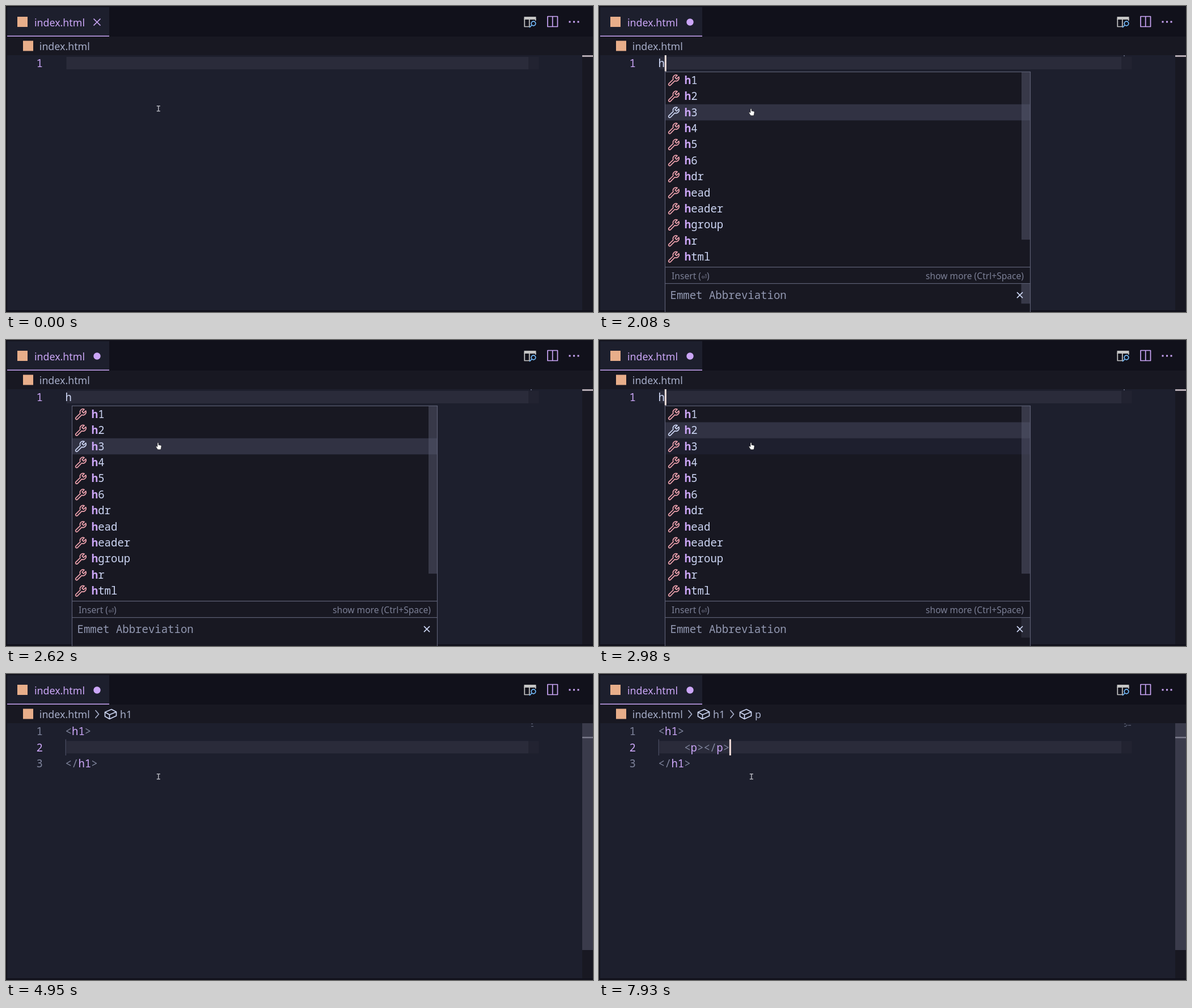
These frames come from a looping animation (1035x541 px, 8 s). An HTML page:

```html
<!DOCTYPE html>
<html lang="en">
<head>
<meta charset="utf-8">
<title>Editor completion</title>
<style>
  html, body { margin: 0; width: 100%; height: 100%; overflow: hidden; background: #11111b; }
  svg { display: block; width: 1035px; height: 541px; }
  text { white-space: pre; }
  .ui { font: 17.8px "Noto Sans", "Open Sans", sans-serif; fill: #a6adc8; }
  .code { font: 19px "Noto Sans Mono", "DejaVu Sans Mono", monospace; fill: #cdd6f4; }
  .small { font-size: 15.6px; fill: #7b7f95; }
  .key { font: 12px "DejaVu Sans", sans-serif; }
  .hint { font-size: 16.2px; fill: #9399b2; }
  .doc { fill: #9399b2; }
  .tag { fill: #cba6f7; }
  .dim { fill: #7f849c; }
  .match { fill: #cba6f7; font-weight: 700; }
  .line { fill: none; stroke-width: 1.7; stroke-linejoin: round; }
  .row .line { stroke: #eba0ac; }
  .row .snip { stroke: #f2cdcd; }
  .row.on .line { stroke: #cdd6f4; }
  .mauve { stroke: #cba6f7; }
  .pale { stroke: #cdd6f4; }
  .edge { fill: none; stroke: #5c5f74; stroke-width: 1.2; }
  .panel { fill: #181822; }
  .bar { fill: #585b70; fill-opacity: .5; }
  .mini { fill: #6c7086; fill-opacity: .8; }
</style>
</head>
<body>
<svg viewBox="0 0 1035 541">
  <defs>
    <path id="wrench" transform="scale(1.42)" stroke-width="1.2"
      d="M1.8 14.2a1.4 1.4 0 0 1 0-2L7.2 6.9a3.8 3.8 0 0 1 5-5L9.5 4.7l1.8 1.8 2.8-2.7a3.8 3.8 0 0 1-5 5L3.8 14.2a1.4 1.4 0 0 1-2 0z"/>
    <path id="cube" class="line pale" d="M1 6 12.5 1 21 5.5V12.5L9 18 1 13.5zM1 6l8 4.5L21 5.5M9 10.5V18"/>
    <path id="chevron" class="line" stroke="#a6adc8" d="M0 0l6 7-6 7"/>
  </defs>

  <!-- window frame -->
  <rect width="1035" height="541" fill="#11111b"/>
  <rect x="2" y="2" width="180" height="51" fill="#1d1f2d"/>
  <rect x="2" y="52.5" width="180" height="1.5" fill="#cba6f7"/>
  <rect x="2" y="54" width="1033" height="33" class="panel"/>
  <rect x="2" y="87" width="1014" height="451" fill="#1d1f2d"/>
  <rect x="1016" y="87" width="19" height="451" class="panel"/>

  <rect x="20" y="19" width="18" height="18" fill="#e8ae8a"/>
  <text class="ui tag" x="50" y="36">index.html</text>
  <path class="line mauve" d="M154.500 22.500l12 12M166.500 22.500l-12 12" data-t="0-640"/>
  <circle cx="160.5" cy="28.5" r="6.2" class="tag" data-t="640-8000"/>

  <g>
    <path fill="#c5c5c5" d="M913.5 19h21v5h-21z"/>
    <path class="line" stroke="#c5c5c5" d="M914.3 22v14.5h8.5V22M933.7 22v4"/>
    <circle class="line" cx="930" cy="31" r="3.8" stroke="#75beff"/>
    <path class="line" stroke="#75beff" d="M927 34l-4 4"/>
    <path class="line mauve" d="M955 18.5h17.5v18h-17.5zM963.7 18.5v18"/>
    <path class="tag" d="M992.5 26.5h3v3h-3zM1000 26.5h3v3h-3zM1007.5 26.5h3v3h-3z"/>
  </g>

  <!-- breadcrumbs -->
  <rect x="30" y="61.5" width="18" height="18" fill="#e8ae8a"/>
  <text class="ui" x="58.8" y="78">index.html</text>
  <g data-t="3780-8000">
    <use href="#chevron" x="157.5" y="64"/>
    <use href="#cube" x="173.5" y="61.5"/>
    <text class="ui" x="201" y="78">h1</text>
  </g>
  <g data-t="6730-8000">
    <use href="#chevron" x="231.5" y="64"/>
    <use href="#cube" x="247.5" y="61.5"/>
    <text class="ui" x="275" y="78">p</text>
  </g>

  <!-- editor -->
  <g id="current">
    <rect x="106.5" y="90" width="814.5" height="22" fill="#2a2b3a"/>
    <rect x="921" y="90" width="18.5" height="22" fill="#222331"/>
  </g>
  <g class="code">
    <text class="tag" x="53.5" y="108" data-t="0-4050">1</text>
    <text x="104.6" y="108" data-t="640-3330">h</text>
    <g data-t="3330-4050" id="pair"></g>
    <g data-t="4050-8000" id="block">
      <text class="dim" x="53.5" y="108">1</text>
      <text class="tag" x="53.5" y="136.5">2</text>
      <text class="dim" x="53.5" y="165">3</text>
      <path stroke="#585b70" d="M105.3 115.5v28.5"/>
    </g>
    <text x="150.2" y="136.5" data-t="5570-6290">p</text>
    <g data-t="6290-8000" id="inner"></g>
  </g>

  <!-- minimap and scrollbar -->
  <path class="mini" d="M925 87h2v2h-2z" data-t="640-3330"/>
  <path class="mini" d="M926 87h4v1.5h-4zM931 87h5v1.5h-5z" data-t="3330-4050"/>
  <path class="mini" d="M926 87.5h3v1.2h-3zM926 92h4v1.2h-4z" data-t="4050-8000"/>
  <path class="mini" d="M929 90h2v1.2h-2z" data-t="5570-6290"/>
  <path class="mini" d="M929 90h3v1.2h-3zM933 90h5v1.2h-5z" data-t="6290-8000"/>
  <rect x="1016" y="87" width="19" height="3" fill="#b5abb3" data-t="0-4050"/>
  <g id="thumb" data-t="4050-8000">
    <rect x="1016" y="87" width="19" height="401" fill="#3a3b4b"/>
    <rect x="1016" y="111" width="19" height="2.5" fill="#7a7b8b"/>
  </g>

  <g id="tags" transform="translate(116.5 116.5)" data-t="730-3330"></g>
  <g id="words" transform="translate(161.5 145.5)" data-t="5660-6290"></g>

  <rect id="caret" width="3" height="28.5" fill="#f5e0dc"/>

  <path id="beam" fill="none" stroke="#b4b5bd" stroke-width="1.5"
    d="M265.8 176.700h2.2l.8.8.8-.8h2.2M265.8 185.800h2.2l.8-.8.8.8h2.2M268.8 177.500v7.5"/>
  <path id="hand" fill="#fff" stroke="#222" stroke-width=".6"
    d="M267 182q1-1.2 2 0v3.5l4 .8q1.2.4 1 1.8l-.8 4.2q-.3 1.5-1.7 1.5h-3q-1.2-.2-1.8-1.3l-2.2-3.5q-.3-1.5 1.2-1.2l1.3 1z"/>
</svg>
<script>
const LOOP = 8000, ROW = 28.4, COL = 11.4, LEFT = 104.6;
const $ = id => document.getElementById(id);
const escape = s => s.replace(/</g, '&lt;').replace(/>/g, '&gt;');
const span = (cls, s) => `<tspan class="${cls}">${escape(s)}</tspan>`;

// Colours the angle brackets grey and the names mauve.
const markup = (s, x, y) => `<text x="${x}" y="${y}">` +
  s.replace(/(<\/?)(\w+)(>)/g, (_, open, name, close) =>
    span('dim', open) + span('tag', name) + span('dim', close)) + '</text>';

$('pair').innerHTML = markup('<h1></h1>', LEFT, 108);
$('block').innerHTML += markup('<h1>', LEFT, 108) + markup('</h1>', LEFT, 165);
$('inner').innerHTML = markup('<p></p>', LEFT + 4 * COL, 136.5);

function itemRow(item, i) {
  const [name, hint] = item.split(':'), y = 14.7 + i * ROW;
  const icon = hint
    ? `<path class="line snip" d="M7 ${y + 7}V${y - 9.5}h19V${y + 7}"/>
       <path class="line snip" stroke-dasharray="2 1.8" d="M6 ${y + 10}h21"/>`
    : `<use href="#wrench" class="line" style="stroke-width:1.2" x="4.2" y="${y - 11.4}"/>`;
  const note = hint ? `<text class="code hint" x="628" y="${y + 5}" text-anchor="end">${hint}</text>` : '';
  return `<g class="row">${icon}<text class="code" x="34.3" y="${y + 6.5}">${span('match', name[0])}${name.slice(1)}</text>${note}</g>`;
}

// height: whole popup; docThumb and listThumb: scrollbar lengths.
function popup(id, { items, hover, sample, height, docThumb, listThumb }) {
  const foot = items.length * ROW + 4.3, doc = foot + 29, base = foot + 21.5;
  $(id).innerHTML = `
    <rect width="644" height="${doc}" class="panel"/>
    <rect class="hover" x=".6" y="${.5 + hover * ROW}" width="643" height="${ROW}" fill="#1e1f2e"/>
    <rect class="pick" x=".6" y=".5" width="643" height="${ROW}" fill="#313243"/>
    ${items.map(itemRow).join('')}
    <rect class="bar" x="628.5" y=".6" width="15" height="${listThumb}"/>
    <g class="ui">
      <text class="small" x="11.5" y="${base}">Insert (<tspan class="key">⏎</tspan>)</text>
      <text class="small" x="632.5" y="${base}" text-anchor="end">show more (Ctrl+Space)</text>
    </g>
    <rect class="edge" width="644" height="${doc}"/>
    <path class="edge" d="M0 ${foot}h644"/>
    <g class="docs">
      <rect class="panel" y="${doc}" width="644" height="${height - doc}"/>
      <text class="code doc" x="9" y="${doc + 27.5}">Emmet Abbreviation</text>
      <text class="code" x="9" y="${doc + 84}">${escape(sample)}</text>
      <rect class="bar" x="628" y="${doc + .6}" width="15.5" height="${docThumb}"/>
      <path class="line pale" d="M620.5 ${doc + 15.5}l10 10m0-10l-10 10"/>
      <rect class="edge" y="${doc}" width="644" height="${height - doc}"/>
    </g>`;
}

popup('tags', {
  items: 'h1 h2 h3 h4 h5 h6 hdr head header hgroup hr html'.split(' '),
  hover: 2, sample: '<h1>|</h1>', height: 480, docThumb: 35, listThumb: 296
});
popup('words', {
  items: 'p param pic picture plaintext pre prog pge:propertyGet prom:promise pse:propertyset'.split(' '),
  hover: 1, sample: '<p>|</p>', height: 394, docThumb: 62, listThumb: 0
});
$('words').querySelector('.row').classList.add('on');

// Held values: the last entry whose time has passed.
const at = (steps, t) => steps.reduce((v, [s, x]) => s <= t ? x : v, steps[0][1]);

const fadeOut = t => [[t, .8], [t + 90, .3], [t + 180, 0]];
const fadeIn = t => [[t, .15], [t + 90, .55], [t + 170, .9], [t + 260, 1]];
const glow = [[0, 0], [90, .3], [180, .8], [270, 1],
  ...fadeOut(1360), ...fadeIn(1720), ...fadeOut(2350), ...fadeIn(2710),
  ...fadeOut(4770), ...fadeIn(5130), [5570, 1], [6200, .8], [6290, 1],
  ...fadeOut(7110), [7550, 1]];
const column = [[0, 0], [640, 1], [3330, 2.5], [3420, 3.8], [3500, 4], [5570, 5],
  [6290, 6.3], [6380, 6.9], [6480, 7], [7550, 8], [7930, 11]];
const picked = [[0, 0], [1630, 1], [2080, 2], [2980, 1], [3070, 0]];
const docBar = [[0, 1], [2170, .9], [2260, .75], [2350, .5], [2440, .3], [2530, .12], [2620, 0], [2980, .5], [3070, 1]];
const thumb = [[0, .4], [4140, .8], [4220, 1]];

const timed = [...document.querySelectorAll('[data-t]')].map(el => [el, ...el.dataset.t.split('-').map(Number)]);
const tags = $('tags'), rows = tags.querySelectorAll('.row');
const pick = tags.querySelector('.pick'), docs = tags.querySelector('.docs');
const bar = docs.querySelector('.bar'), hover = tags.querySelector('.hover');
const show = (el, on) => el.style.display = on ? '' : 'none';

function draw(t) {
  for (const [el, from, to] of timed) show(el, t >= from && t < to);
  const line = t < 4050 ? 0 : ROW;
  $('current').setAttribute('transform', `translate(0 ${line})`);
  $('caret').setAttribute('x', LEFT - .2 + at(column, t) * COL);
  $('caret').setAttribute('y', 87 + line);
  $('caret').style.opacity = at(glow, t);

  const n = at(picked, t);
  pick.setAttribute('y', .5 + n * ROW);
  rows.forEach((r, i) => r.classList.toggle('on', i === n));
  show(docs, t >= 820);
  show(hover, t >= 820);
  bar.style.opacity = at(docBar, t);
  $('thumb').style.opacity = at(thumb, t);

  const hand = t >= 820 && t < 3330 || t >= 5660 && t < 6290;
  show($('hand'), hand);
  show($('beam'), !hand);
}

const start = performance.now();
function tick() {
  draw((performance.now() - start) % LOOP);
  requestAnimationFrame(tick);
}
draw(0);
requestAnimationFrame(tick);
</script>
</body>
</html>
```
